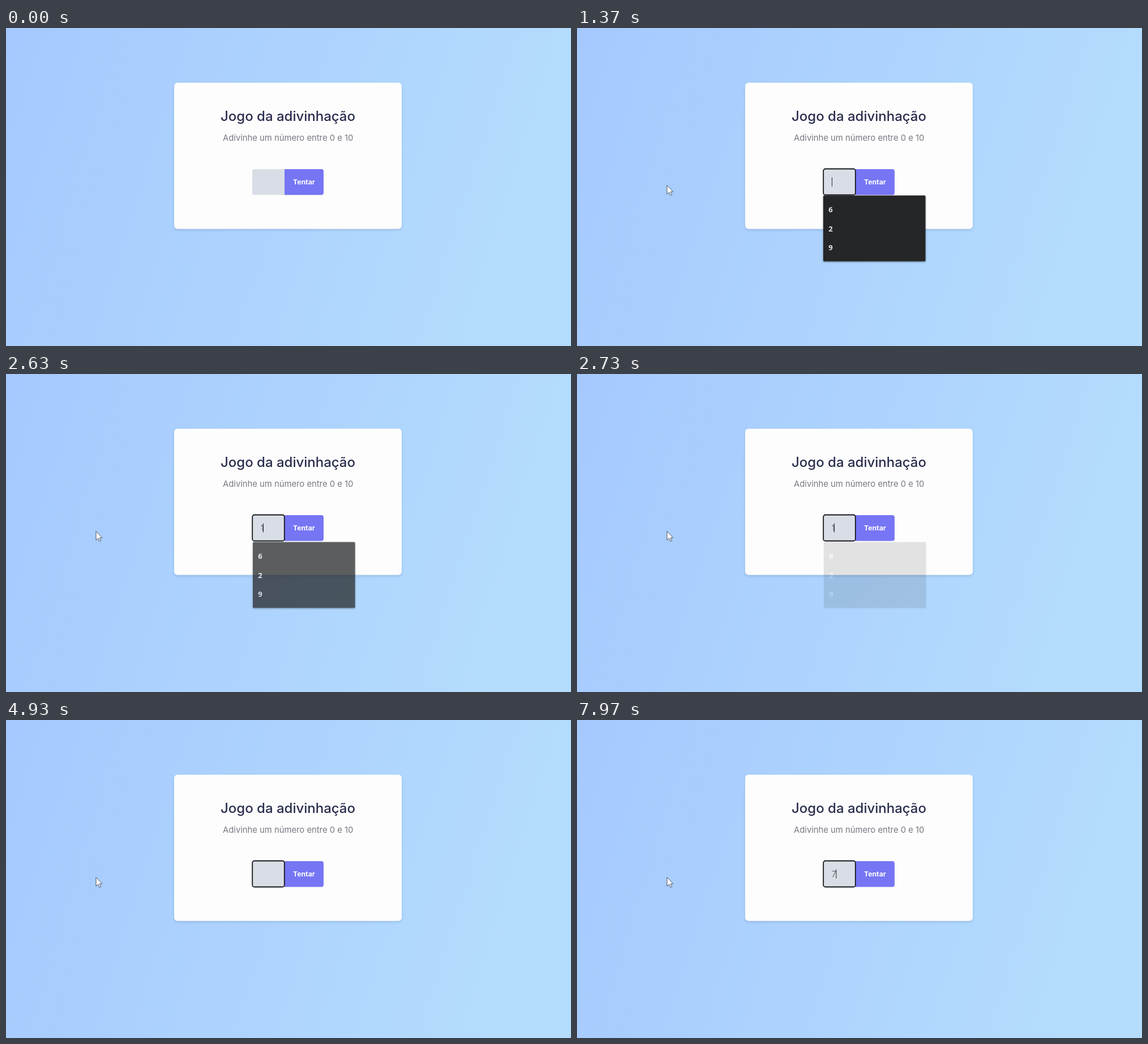
These frames come from a looping animation (998 by 561 pixels, 8 s). An HTML page:

```html
<!DOCTYPE html>
<html lang="pt-BR">
<head>
<meta charset="utf-8">
<title>Jogo da adivinhação</title>
<style>
  html, body { margin: 0; width: 100%; height: 100%; overflow: hidden; background: #add2fe; }
  svg { display: block; width: 100%; height: 100%; }
  text { font-family: Inter, "Open Sans", sans-serif; }
  .middle { text-anchor: middle; }
  .title { font-size: 24px; font-weight: 500; fill: #292d4d; }
  .hint { font-size: 14.8px; fill: #777782; }
  .label { font-size: 12.2px; font-weight: 700; fill: #fff; }
  .value { font-size: 14px; font-weight: 300; fill: #44444c; }
  .option { font-family: "Noto Sans", "Open Sans", sans-serif; font-size: 13px; font-weight: 600; fill: #e8eaec; }
  #card { filter: drop-shadow(0 2px 2px rgba(50, 80, 130, .2)); }
  #menu { filter: drop-shadow(0 1px 1.5px rgba(0, 0, 0, .5)); }
</style>
</head>
<body>
<svg viewBox="0 0 998 561">
  <defs>
    <linearGradient id="sky" x1="0" y1="0" x2="1" y2=".18">
      <stop offset="0" stop-color="#a5c9fe"/>
      <stop offset="1" stop-color="#b4dcfd"/>
    </linearGradient>
  </defs>
  <rect width="998" height="561" fill="url(#sky)"/>

  <rect id="card" x="297" y="96.5" width="402" height="258" rx="6" fill="#fdfdfd"/>
  <text class="middle title" x="498" y="164">Jogo da adivinhação</text>
  <text class="middle hint" x="498.2" y="199">Adivinhe um número entre 0 e 10</text>

  <path d="M492 249H439a4 4 0 0 0-4 4v37.5a4 4 0 0 0 4 4h53z" fill="#d9dee6"/>
  <path d="M492 249h65a4 4 0 0 1 4 4v37.5a4 4 0 0 1-4 4h-65z" fill="#7675f4"/>
  <text class="middle label" x="526.4" y="276">Tentar</text>

  <rect id="focus" x="435.2" y="248.5" width="56.6" height="46" rx="3.5" fill="none" stroke="#15161a" stroke-width="1.8"/>
  <text id="first" class="value" x="449.5" y="276.5">1</text>
  <text id="second" class="value" x="450" y="276.5">7</text>
  <rect id="caret" x="450" y="263.5" width="1" height="16" fill="#26262c"/>

  <g id="menu">
    <rect x="435" y="295.5" width="180.5" height="116" rx="1.5" fill="#242627"/>
    <text class="option" x="444.3" y="325">6</text>
    <text class="option" x="444.3" y="358.7">2</text>
    <text class="option" x="444.3" y="392.4">9</text>
  </g>

  <g id="pointer">
    <path id="arrow" d="M.5.5V16.2L4.2 12.8 6.6 18.2 9 17.1 6.7 11.9H11.3z" fill="#fff" stroke="#3d4250" stroke-width=".9" stroke-linejoin="round"/>
    <path id="beam" d="M-3-8h2.2L0-7.2.8-8H3M0-7.2V7.2M-3 8h2.2L0 7.2.8 8H3" fill="none" stroke="#22242a"/>
  </g>
</svg>
<script>
const LOOP = 8000, FOCUS = 1100, FIRST_KEY = 2370, SUBMIT = 2930, SECOND_KEY = 7930;
const start = document.timeline.currentTime;

// steps: [ms, properties]; values hold until the next step unless an easing is given
function play(id, steps) {
  const frames = [...steps, [LOOP, steps.at(-1)[1]]].map(([ms, props]) =>
    ({ offset: ms / LOOP, easing: "step-end", ...props }));
  const animation = document.getElementById(id)
    .animate(frames, { duration: LOOP, iterations: Infinity });
  animation.startTime = start;
}

const show = on => ({ opacity: on ? 1 : 0 });
const at = (x, y, easing = "linear") => ({ transform: `translate(${x}px, ${y}px)`, easing });

// Shown and hidden alternately, starting hidden
const toggle = (id, ...times) =>
  play(id, [0, ...times].map((ms, i) => [ms, show(i % 2)]));

// Each key press restarts the caret's half-second blink
function blinkTimes() {
  const times = [];
  for (const [from, to] of [[FOCUS, FIRST_KEY], [FIRST_KEY, SECOND_KEY]]) {
    for (let ms = from; ms < to; ms += 1000) {
      times.push(ms);
      if (ms + 500 < to) times.push(ms + 500);
    }
    if (times.length % 2) times.push(to);
  }
  return [...times, SECOND_KEY];
}

toggle("focus", FOCUS);
toggle("first", FIRST_KEY, SUBMIT);
toggle("second", SECOND_KEY);
toggle("caret", ...blinkTimes());
toggle("arrow", 330, 850, 1120);
toggle("beam", 850, 1120);

play("caret", [
  [0, at(0, 0, "step-end")],
  [FIRST_KEY, at(4, 0, "step-end")],
  [SUBMIT, at(0, 0, "step-end")],
  [SECOND_KEY, at(7.3, 0, "step-end")]
]);

play("menu", [
  [0, show(false)],
  [1130, { opacity: 0, easing: "linear" }],
  [1230, show(true)],
  [2590, { opacity: 1, easing: "linear" }],
  [2750, show(false)]
]);
play("menu", [
  [0, at(0, 0, "step-end")],
  [2590, at(1, 1, "step-end")],
  [2750, at(0, 0, "step-end")]
]);

play("pointer", [
  [0, at(520, 565)],
  [330, at(520, 565, "ease-out")],
  [800, at(465, 293.5)],
  [900, at(463, 276)],
  [1110, at(463, 276, "ease-in-out")],
  [1340, at(158.5, 277)]
]);
</script>
</body>
</html>
```
